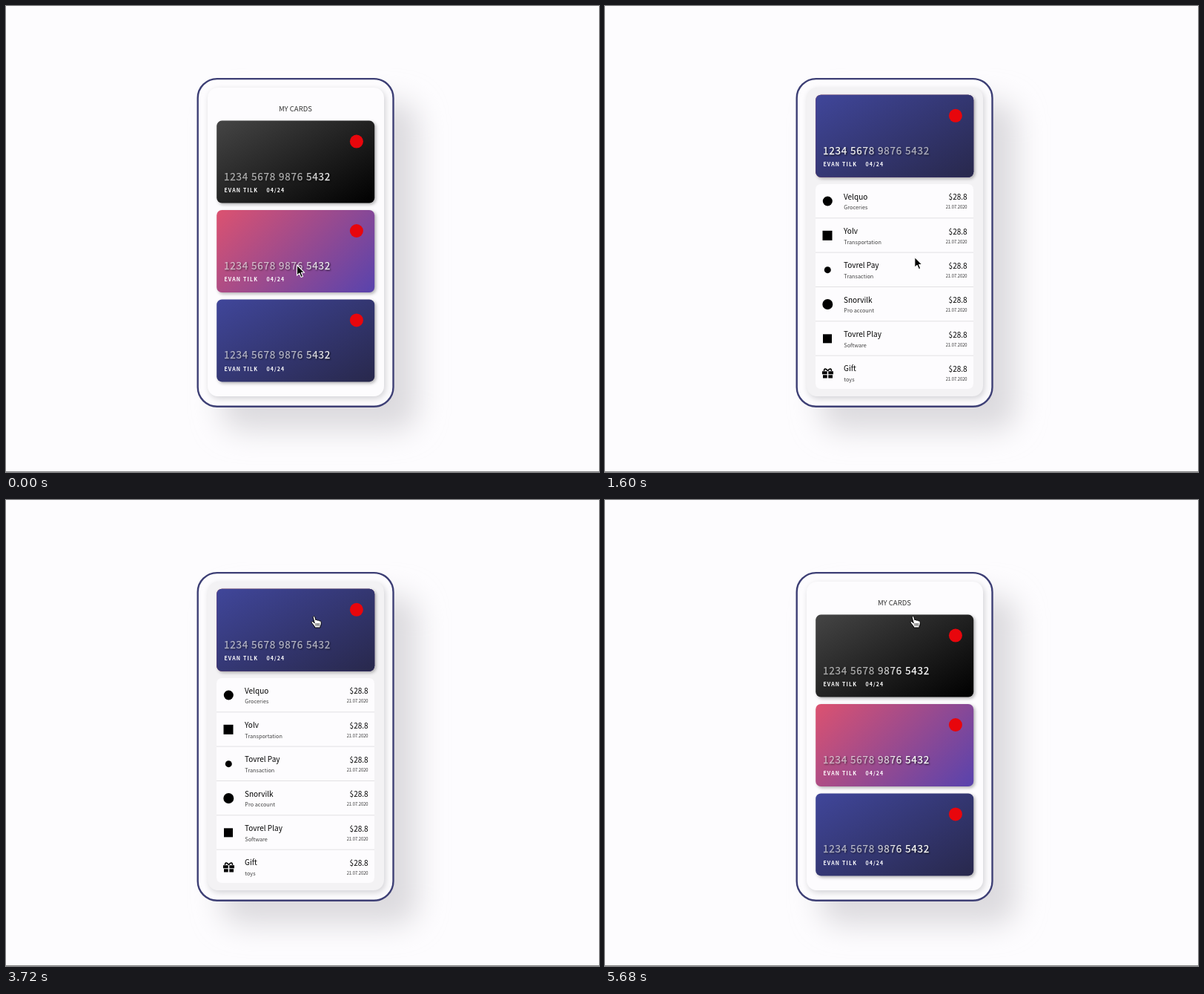
Recreate the animation shown at these times as an HTML page. Size 800 by 628 pixels, loop 5.72 s.

```html
<!DOCTYPE html>
<html lang="en">
<head>
<meta charset="utf-8">
<title>My cards</title>
<style>
  html, body { margin: 0; width: 100%; height: 100%; overflow: hidden; background: #fdfcfe; }
  svg { display: block; width: 800px; height: 628px; }
  text { font-family: "Noto Sans CJK JP", "Noto Sans CJK SC", "Noto Sans CJK", "Open Sans", sans-serif; }
  .title { font-size: 9.5px; font-weight: 300; text-anchor: middle; fill: #333; }
  .number { font-size: 13.5px; font-weight: 500; letter-spacing: .8px; fill: url(#shine);
            stroke: url(#shine); stroke-width: .25px;
            filter: drop-shadow(1px 1.5px 1px rgba(0, 0, 0, .85)); }
  .holder { font-size: 7px; font-weight: 600; letter-spacing: 1.15px; fill: #fff; }
  .card { filter: drop-shadow(2px 2px 2px rgba(0, 0, 0, var(--shade, .3))); }
  .name { font-size: 10px; }
  .kind { font-size: 7.3px; fill: #444; }
  .price { font-size: 10px; font-weight: 500; text-anchor: end; }
  .date { font-size: 5.8px; fill: #333; text-anchor: end; }
</style>
</head>
<body>
<svg viewBox="0 0 800 628">
  <defs>
    <linearGradient id="shine" gradientUnits="userSpaceOnUse" y1="0" y2="0">
      <stop offset="0" stop-color="#fff" stop-opacity=".6"/>
      <stop offset=".38" stop-color="#fff"/>
      <stop offset=".62" stop-color="#fff"/>
      <stop offset="1" stop-color="#fff" stop-opacity=".6"/>
    </linearGradient>
    <filter id="soft" x="-30%" y="-30%" width="160%" height="160%"><feGaussianBlur stdDeviation="19"/></filter>
    <filter id="near" x="-10%" y="-10%" width="120%" height="120%"><feGaussianBlur stdDeviation="4.5"/></filter>
    <clipPath id="panelClip"><rect x="272" y="110" width="238" height="416" rx="14"/></clipPath>
    <clipPath id="listClip"><rect x="284" y="240" width="213" height="276" rx="7"/></clipPath>
  </defs>

  <rect width="800" height="628" fill="#fdfcfe"/>
  <rect x="290" y="129" width="265" height="443" rx="28" fill="#dcdade" filter="url(#soft)"/>
  <rect x="258.7" y="98.1" width="263.8" height="441.6" rx="26" fill="#fdfcfe" stroke="#3d3f75" stroke-width="2.4"/>
  <rect x="274" y="113" width="238" height="416" rx="14" fill="#d2d1d5" filter="url(#near)"/>

  <g clip-path="url(#panelClip)">
    <rect x="272" y="110" width="238" height="416" fill="#f3f2f4"/>
    <rect id="sheet" x="272" y="96" width="238" rx="13" fill="#fdfcfe"/>
    <g id="list">
      <g clip-path="url(#listClip)">
        <rect x="284" y="240" width="213" height="276" fill="#fdfcfe"/>
        <g id="rows"></g>
      </g>
    </g>
    <text class="title" x="390.4" y="142.2">MY CARDS</text>
    <g id="cards"></g>
  </g>

  <g id="arrow">
    <path d="M0 0V14.2L3.3 11.2L5.6 16.4L8 15.4L5.8 10.3H10.2Z" fill="#000" stroke="#fff" stroke-width="1.1" stroke-linejoin="round"/>
  </g>
  <g id="hand" stroke="#000" stroke-linejoin="round" stroke-linecap="round">
    <path d="M-1.6 1C-1.8 -.6 .3 -1 .9 .6L2.2 4.9C3 4.2 4.3 4.4 4.6 5.4C5.4 4.8 6.7 5.1 7 6.1C8 5.6 9.3 6.2 9.4 7.5C9.6 10 9 11.5 8.2 13V15H.8L.6 13.6C-.8 11.8 -2.2 10 -3.6 8.2C-4 6.9 -2.6 6.3 -1.6 7.1L.2 8.6Z" fill="#fff" stroke-width="1"/>
    <path d="M2.3 9.4V12.4M4.4 9.4V12.4M6.4 9.4V12.4" fill="none" stroke-width=".8"/>
  </g>
  <rect y="627" width="800" height="1" fill="#858585"/>
</svg>
<script>
const LOOP = 5720, STEP = 40, ROW = 46.33;
const OPEN = 353, CLOSE = 3890, SLIDE = 800;
const $ = id => document.getElementById(id);

const clamp = x => Math.min(1, Math.max(0, x));
const mix = (a, b, k) => a + (b - a) * k;
const smooth = x => (1 - Math.cos(Math.PI * clamp(x))) / 2;
const span = (t, from, to) => smooth((t - from) / (to - from));

// cubic-bezier(.25, .1, .25, 1)
function ease(x) {
  x = clamp(x);
  const bezier = (a, b, s) => 3 * a * s * (1 - s) ** 2 + 3 * b * s * s * (1 - s) + s ** 3;
  let lo = 0, hi = 1;
  for (let i = 0; i < 24; i++) {
    const mid = (lo + hi) / 2;
    if (bezier(.25, .25, mid) < x) lo = mid; else hi = mid;
  }
  return bezier(.1, 1, lo);
}

const disc = r => `<circle cx="300.3" cy="263" r="${r}"/>`;
const square = a => `<rect x="${300 - a / 2}" y="${263 - a / 2}" width="${a}" height="${a}"/>`;
const gift = `<path d="M293 260.5h6.7v4h-6.7zM301.3 260.5h6.7v4h-6.7zM294 265.7h5.7v4.1h-5.7zM301.3 265.7h5.7v4.1h-5.7z"/>
  <path d="M300.5 260.2C298.5 256.5 295 256.6 295.6 260.2M300.5 260.2C302.5 256.5 306 256.6 305.4 260.2" fill="none" stroke="#000" stroke-width="1.6"/>`;

const entries = [
  ['Velquo', 'Groceries', disc(6.5)],
  ['Yolv', 'Transportation', square(13)],
  ['Tovrel Pay', 'Transaction', disc(4.5)],
  ['Snorvilk', 'Pro account', disc(7)],
  ['Tovrel Play', 'Software', square(12)],
  ['Gift', 'toys', gift],
  ['Fulmbay', 'Software', square(11)],
];

$('rows').innerHTML = Array.from({ length: 10 }, (_, i) => {
  const [name, kind, icon] = entries[i % entries.length];
  return `<g transform="translate(0 ${i * ROW})">${icon}
    <text class="name" x="322" y="260.6">${name}</text>
    <text class="kind" x="322.3" y="274.3">${kind}</text>
    <text class="price" x="488.6" y="261.3">$28.8</text>
    <text class="date" x="488.6" y="273.3">21.07.2020</text>
    <rect x="284" y="285.3" width="213" height="1" fill="#e2e1e4"/></g>`;
}).join('');

const steep = 'x1="55.8" y1="-32.2" x2="157.2" y2="143.2"';
const diagonal = 'x1="25.5" y1="-25.5" x2="187.5" y2="136.5"';
const skins = [
  ['#454545', '#000', steep],
  ['#dc5270', '#5843ad', diagonal],
  ['#40469a', '#28284c', steep],
];
$('cards').innerHTML = skins.map(([from, to, line], i) => `
  <g class="slot">
    <linearGradient id="skin${i}" gradientUnits="userSpaceOnUse" ${line}>
      <stop offset="0" stop-color="${from}"/><stop offset="1" stop-color="${to}"/>
    </linearGradient>
    <rect class="card" width="213" height="111" rx="7" fill="url(#skin${i})"/>
    <circle cx="188.7" cy="28" r="9" fill="#e8060c"/>
    <text class="number" x="9.8" y="80">1234 5678 9876 5432</text>
    <text class="holder" x="10.2" y="96.4">EVAN TILK</text>
    <text class="holder" x="67.2" y="96.4">04/24</text>
  </g>`).join('');
const slots = [...document.querySelectorAll('.slot')];

// Only the rear card keeps its shadow while the cards are stacked.
function drawCards(p) {
  const top = mix(154.6, 119.8, p), pitch = mix(120.4, 0, p);
  slots.forEach((slot, i) => {
    slot.setAttribute('transform', `translate(284.2 ${top + i * pitch})`);
    slot.style.setProperty('--shade', .3 * (i ? clamp(1 - 4 * p) : 1));
  });
}

function drawList(p, t) {
  const drop = 288 * (1 - p);
  $('sheet').setAttribute('height', 240 + drop - 96);
  $('sheet').setAttribute('opacity', 1 - p * p);
  $('list').setAttribute('transform', `translate(0 ${drop})`);
  $('list').setAttribute('opacity', p ** .7);
  const scroll = 172 * (span(t, 1740, 2350) - span(t, 2350, 2980));
  $('rows').setAttribute('transform', `translate(0 ${-scroll})`);
}

function drawShine(t) {
  const phase = (t + 2400) % 3000 + 600;
  const center = (phase - 1200) * .1 - 8;
  $('shine').setAttribute('x1', center - 62);
  $('shine').setAttribute('x2', center + 62);
}

function drawCursor(t) {
  const down = span(t, 0, 320), across = span(t, 600, 1200), up = span(t, 3080, 3560);
  const x = mix(mix(392.5, 387.5, down), 417.8, across) - 2 * up;
  const y = mix(mix(mix(349, 422, down), 338.3, across), 157, up);
  const pointing = (t >= 160 && t < 600) || (t > 3080 && y < 231);
  $('hand').setAttribute('visibility', pointing ? 'visible' : 'hidden');
  $('arrow').setAttribute('visibility', pointing ? 'hidden' : 'visible');
  $(pointing ? 'hand' : 'arrow').setAttribute('transform', `translate(${x} ${y})`);
}

function render(t) {
  const p = ease((t - OPEN) / SLIDE) - ease((t - CLOSE) / SLIDE);
  drawCards(p);
  drawList(p, t);
  drawShine(t);
  drawCursor(t);
}

const start = performance.now();
function tick() {
  const t = (performance.now() - start) % LOOP;
  render(Math.floor(t / STEP) * STEP);
  requestAnimationFrame(tick);
}
tick();
</script>
</body>
</html>
```
